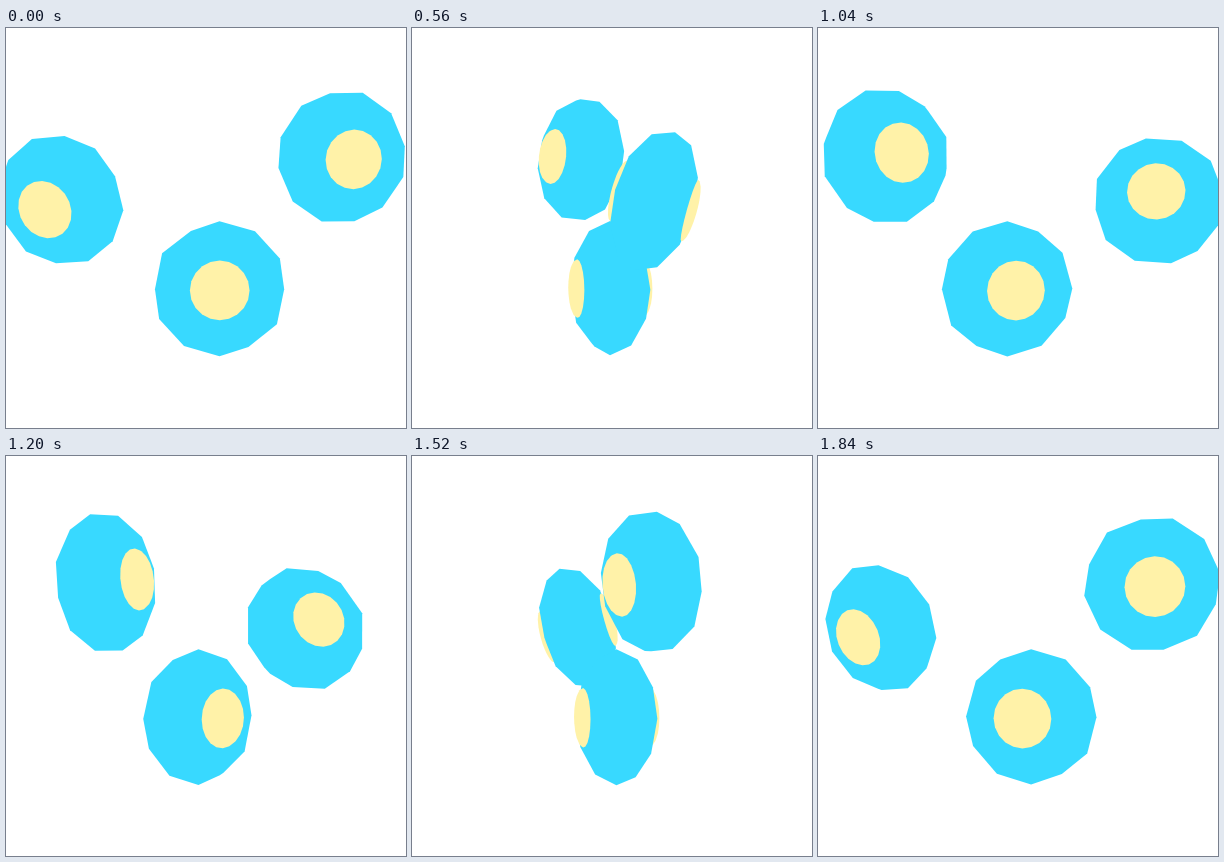
These frames come from a looping animation (400 by 400 pixels, 1920 ms). An HTML page with a canvas:

```html
<!DOCTYPE html>
<html>
<head>
<meta charset="utf-8">
<style>
  html, body { margin: 0; width: 100%; height: 100%; overflow: hidden; background: #fff; }
  canvas { display: block; }
</style>
</head>
<body>
<canvas id="stage" width="400" height="400"></canvas>
<script>
const ctx = document.getElementById('stage').getContext('2d');
const BLUE = '#38d9ff', YELLOW = '#fff2a8';
const LOOP = 1920, STEP = 80;
const CX = 201.2, HORIZON = 168, DEPTH = 1850;
const rad = deg => deg * Math.PI / 180;

// Unit sphere point, poles on the y axis (y points down).
const spherePoint = (lat, az) => {
  const r = Math.cos(rad(lat));
  return [r * Math.cos(rad(az)), -Math.sin(rad(lat)), r * Math.sin(rad(az))];
};

// Once-subdivided icosahedron, flattened front to back.
function makeBody() {
  const pts = [spherePoint(90, 0), spherePoint(-90, 0)];
  for (let k = 0; k < 10; k++) {
    const side = k % 2 ? -1 : 1, az = 36 * k;
    pts.push(
      spherePoint(58.28 * side, az),
      spherePoint(26.57 * side, az),
      spherePoint(31.72 * side, az + 36),
      spherePoint(0, az + 18)
    );
  }
  return pts.map(([x, y, z]) => [67.5 * x, 67.5 * y, 38 * z]);
}

// Shallow round cap on the front (side 1) or back (side -1).
function makeDome(side) {
  const pts = [];
  for (let lat = 0; lat < 90; lat += 15)
    for (let az = 0; az < 360; az += 18) {
      const [x, y, z] = spherePoint(lat, az);
      pts.push([29.3 * x, 29.3 * z, side * (34 - 6 * y)]);
    }
  return pts;
}

const body = makeBody();
const domes = { 1: makeDome(1), '-1': makeDome(-1) };

// Orbit radius (signed), height, then orientation in degrees.
const eggs = [
  { orbit: 12.3, y: 260.7, yaw: 0, pitch: 0, roll: 0 },
  { orbit: 135, y: 129.1, yaw: 15.5, pitch: 5, roll: 17 },
  { orbit: -147, y: 172.4, yaw: -23, pitch: 15.5, roll: -51.5 }
];

const turn = (a, b, deg) => {
  const c = Math.cos(rad(deg)), s = Math.sin(rad(deg));
  return [a * c - b * s, a * s + b * c];
};

function project(egg, angle, [x, y, z]) {
  [x, y] = turn(x, y, egg.roll);
  [z, y] = turn(z, y, egg.pitch);
  [z, x] = turn(z, x, egg.yaw);
  [z, x] = turn(z, x + egg.orbit, angle);
  const scale = DEPTH / (DEPTH - z);
  return [CX + x * scale, HORIZON + (egg.y - HORIZON + y) * scale];
}

function hull(pts) {
  pts.sort((a, b) => a[0] - b[0] || a[1] - b[1]);
  const chain = list => {
    const out = [];
    for (const p of list) {
      while (out.length > 1) {
        const [a, b] = out.slice(-2);
        if ((b[0] - a[0]) * (p[1] - a[1]) > (b[1] - a[1]) * (p[0] - a[0])) break;
        out.pop();
      }
      out.push(p);
    }
    return out.slice(0, -1);
  };
  return chain(pts).concat(chain(pts.slice().reverse()));
}

function drawEgg(egg, angle) {
  const solid = (pts, color) => {
    ctx.fillStyle = color;
    ctx.beginPath();
    hull(pts.map(p => project(egg, angle, p))).forEach(p => ctx.lineTo(...p));
    ctx.fill();
  };
  const facing = Math.cos(rad(egg.yaw + angle)) > 0 ? 1 : -1;
  solid(domes[-facing], YELLOW);
  solid(body, BLUE);
  solid(domes[facing], YELLOW);
}

function draw(now) {
  const t = Math.floor((now % LOOP) / STEP) * STEP;
  const angle = 360 * t / LOOP;
  const depth = egg => -egg.orbit * Math.sin(rad(angle));
  ctx.fillStyle = '#fff';
  ctx.fillRect(0, 0, 400, 400);
  [...eggs].sort((a, b) => depth(a) - depth(b)).forEach(egg => drawEgg(egg, angle));
}

const start = performance.now();
function loop() {
  draw(performance.now() - start);
  requestAnimationFrame(loop);
}
loop();
</script>
</body>
</html>
```
